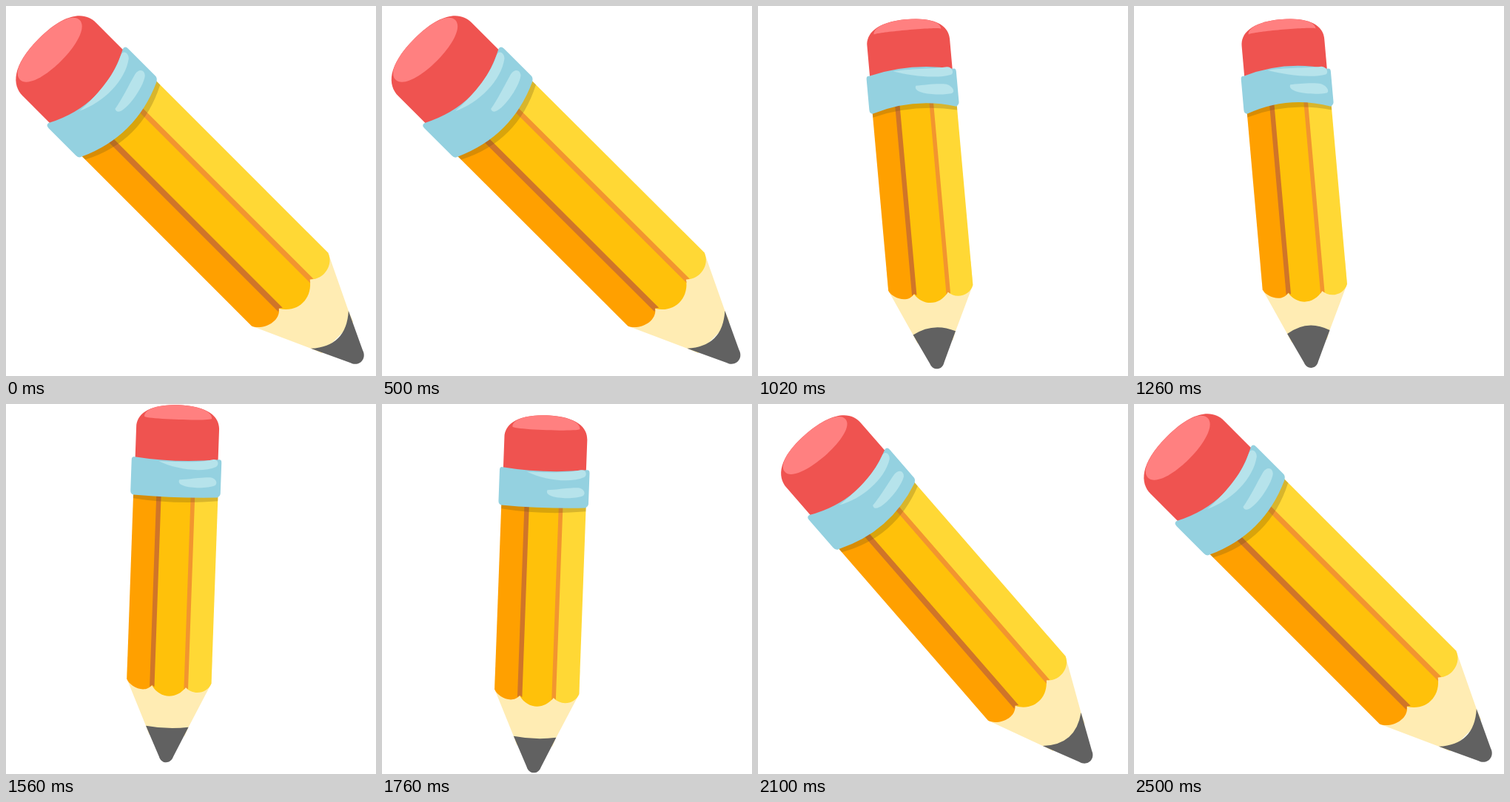
Animation, 500 px wide and 500 px high, one loop 2520 ms. Source, as an HTML page:

```html
<!DOCTYPE html>
<html lang="en">
<head>
<meta charset="utf-8">
<title>Pencil</title>
<style>
  html, body { margin: 0; width: 100%; height: 100%; overflow: hidden; background: #fff; }
  svg { display: block; width: 100vw; height: 100vh; }
</style>
</head>
<body>
<svg viewBox="0 0 500 500">
  <g id="pencil">
    <g id="body">
      <path fill="#ffecb3" d="M-71 150V187L-36 265L-30 280H30L36 265L72 190V150Z"/>
      <path fill="#ffa000" d="M-71-150V187C-66 200-40 212-28 196V-150Z"/>
      <path fill="#ffc10a" d="M-28-150V197C-14 219 14 219 29 198V-150Z"/>
      <path fill="#ffd835" d="M29-150V198C42 212 66 207 72 190V-150Z"/>
      <path fill="#d07528" d="M-32-150H-24V199L-28 196L-32 199Z"/>
      <path fill="#f2952f" d="M26-150H33V201L29 198L26 202Z"/>
      <path id="lead" fill="#616161"/>
    </g>
    <path id="shade" fill="#6e5514" fill-opacity=".27"/>
    <path fill="#ef5350" d="M-70-180V-252C-70-272-52-291 0-291S70-272 70-252V-180Z"/>
    <path id="top" fill="#ff8080"/>
    <path id="band" fill="#94d1e0"/>
    <path id="shine" fill="#b6e3eb"/>
  </g>
</svg>
<script>
const LOOP = 2520, STEP = 20, BEND = 17;
const $ = id => document.getElementById(id);
const draw = (id, d) => $(id).setAttribute('d', d);

const part = (t, a, b) => Math.min(1, Math.max(0, (t - a) / (b - a)));
const bump = (t, a, b) => Math.sin(Math.PI * part(t, a, b)) ** 2;
function ease(t, a, b) {
  const h = part(t, a, b);
  return h * h * (3 - 2 * h);
}

// Wind up, swing upright, sway past vertical, then fall back
function poseAt(t) {
  const lift = ease(t, 560, 907), trail = ease(t, 710, 1080);
  const sway = ease(t, 1240, 1580), drift = ease(t, 1600, 1920);
  const fall = ease(t, 1770, 2172), home = ease(t, 1920, 2140);
  const lean = 45 + 2.5 * bump(t, 490, 660) - 39.9 * lift - 7.2 * sway + 47.1 * fall;
  return {
    lean,
    scale: .8 + .2 * Math.abs(lean / 45) ** 3,
    x: 250 - 31 * trail + 6 * sway - 22 * drift + 47 * home,
    y: 250 - 8 * bump(t, 640, 1000) - 16 * bump(t, 1300, 1820),
    bend: BEND - 29 * trail + 15 * sway + 14 * home
  };
}

function render(t) {
  const { lean, scale, x, y, bend } = poseAt(t);
  const shift = bend - BEND, dip = 2 * bend;
  // Moves a highlight point with the curve of the band
  const p = (v, u) => `${v} ${u + shift * (1 - (v / 75) ** 2)} `;
  const curve = (...pts) => 'C' + pts.map(q => p(...q)).join('');

  $('pencil').setAttribute('transform', `translate(${x} ${y}) rotate(${-lean}) scale(${scale})`);
  $('body').setAttribute('transform', `translate(0 ${shift * .9})`);

  draw('lead', `M-36 265Q0 ${265 + dip * .95} 36 265L12 316C8 329-8 329-12 316Z`);
  draw('shade', `M-71-145Q0 ${-142 + dip} 72-145V-131Q0 ${-128 + dip}-71-131Z`);

  const back = -298, front = -270 + Math.max(bend * 1.7, bend * .4);
  draw('top', `M-57-270C-57 ${back} 57 ${back} 57-270C57 ${front}-57 ${front}-57-270Z`);

  draw('band', `M-71-201Q0 ${-198 + dip} 71-201Q76-202 76-196V-144Q76-140 71-137` +
    `Q0 ${-139 + dip}-71-137Q-76-138-76-144V-196Q-76-202-71-201Z`);

  draw('shine',
    'M' + p(-30, -183) + curve([-5, -181], [36, -183], [61, -196]) +
    curve([70, -201], [73, -192], [67, -186]) + curve([43, -168], [0, -168], [-30, -183]) +
    'ZM' + p(6, -151) + curve([20, -153], [43, -161], [58, -165]) +
    curve([69, -167], [71, -159], [66, -154]) + curve([50, -142], [-2, -136], [6, -151]) + 'Z');
}

const start = performance.now();
function tick() {
  const t = Math.max(0, performance.now() - start) % LOOP;
  render(Math.floor(t / STEP) * STEP);
  requestAnimationFrame(tick);
}
tick();
</script>
</body>
</html>
```
